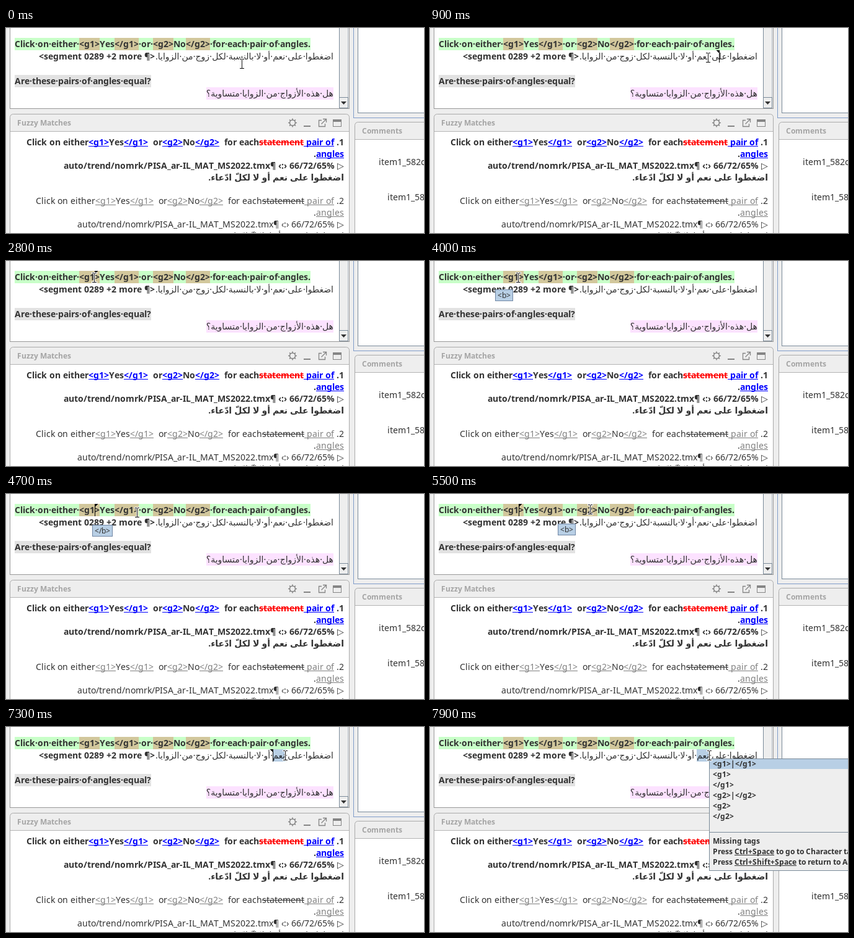
Recreate the animation shown at these times as an HTML page with a canvas. Size 674 px wide and 332 px high, loop 8 s.

```html
<!DOCTYPE html>
<html lang="en">
<head>
<meta charset="utf-8">
<title>Translation editor</title>
<style>
html, body { margin: 0; width: 100%; height: 100%; overflow: hidden; background: #eee; }
canvas { display: block; }
</style>
</head>
<body>
<canvas id="stage" width="674" height="332"></canvas>
<script>
const W = 674, H = 332, LOOP = 8000;
const FONT = '"Noto Sans", "DejaVu Sans", sans-serif';
const INK = '#333', GREY = '#808080', BLUE = '#0000ff', LIGHT = '#b8cfe5', EDGE = '#7a8a99';

const screen = document.getElementById('stage').getContext('2d');
const base = document.createElement('canvas');
base.width = W;
base.height = H;
let g = base.getContext('2d');

const rect = (x, y, w, h, color) => { g.fillStyle = color; g.fillRect(x, y, w, h); };
const frame = (x, y, w, h, fill, edge) => {
  rect(x, y, w, h, edge);
  rect(x + 1, y + 1, w - 2, h - 2, fill);
};

function setFont(size, bold) {
  g.font = (bold ? 'bold ' : '') + size + 'px ' + FONT;
}

const advance = ch => Math.round(g.measureText(ch).width);
const widthOf = text => [...text].reduce((sum, ch) => sum + advance(ch), 0);

function dot(x, y, color) {
  g.textAlign = 'center';
  g.fillStyle = color;
  g.fillText('·', x, y);
  g.textAlign = 'left';
}

// Left-to-right text on whole-pixel advances; returns the end x.
function text(str, x, y, o = {}) {
  const { size = 14, bold = false, color = INK, back, line, strike, dots } = o;
  setFont(size, bold);
  g.textAlign = 'left';
  g.direction = 'ltr';
  const w = widthOf(str);
  if (back) rect(x, y - 15, w, 20, back);
  let cx = x;
  for (const ch of str) {
    const step = advance(ch);
    if (ch === ' ') {
      if (dots) dot(cx + step / 2, y, color);
    } else {
      g.fillStyle = color;
      g.fillText(ch, cx, y);
    }
    cx += step;
  }
  if (line) rect(x, y + 1, w, 1, color);
  if (strike) rect(x, y - 5, w, 1, color);
  return cx;
}

function runs(list, x, y, common) {
  for (const [str, style] of list) x = text(str, x, y, { ...common, ...style });
}

// Right-to-left words, laid out from the right edge.
function arabic(str, right, y, { bold = false, back, dots } = {}) {
  setFont(14, bold);
  const words = str.split(' '), gap = advance(' ');
  const widths = words.map(w => g.measureText(w).width);
  if (back) {
    const w = Math.round(widths.reduce((a, b) => a + b) + gap * (words.length - 1));
    rect(right - w, y - 15, w, 20, back);
  }
  let x = right;
  words.forEach((word, i) => {
    g.direction = 'rtl';
    g.textAlign = 'right';
    g.fillStyle = INK;
    g.fillText(word, x, y);
    x -= widths[i];
    g.direction = 'ltr';
    if (dots && i < words.length - 1) dot(x - gap / 2, y, INK);
    x -= gap;
  });
}

function panel(x, y, w, title, titleX, titleY, headH) {
  g.beginPath();
  g.roundRect(x + .5, y + .5, w, 300, 5);
  g.fillStyle = '#eee';
  g.fill();
  g.strokeStyle = '#aaa';
  g.lineWidth = 1;
  g.stroke();
  rect(x + 1, y + headH, w - 1, 1, '#b4b4b4');
  rect(x + 1, y + headH + 1, w - 1, 300, '#fff');
  text(title, titleX, titleY, { size: 12, bold: true, color: '#a5a5a5' });
}

function headerIcons() {
  const c = '#858585';
  g.strokeStyle = c;
  g.lineWidth = 1.6;
  g.beginPath();
  g.arc(462, 153.5, 4.5, 0, 7);
  for (let i = 0; i < 8; i++) {
    const a = i * Math.PI / 4, cx = Math.cos(a), cy = Math.sin(a);
    g.moveTo(462 + 4.5 * cx, 153.5 + 4.5 * cy);
    g.lineTo(462 + 7 * cx, 153.5 + 7 * cy);
  }
  g.stroke();
  rect(480, 158, 11, 2, c);
  g.lineWidth = 1.3;
  g.beginPath();
  g.moveTo(509, 149.5); g.lineTo(504.5, 149.5); g.lineTo(504.5, 159.5);
  g.lineTo(514.5, 159.5); g.lineTo(514.5, 155);
  g.moveTo(508.5, 155.5); g.lineTo(516, 148);
  g.moveTo(511, 147.5); g.lineTo(516.5, 147.5); g.lineTo(516.5, 153);
  g.stroke();
  frame(527, 148, 14, 12, '#eee', c);
  rect(527, 148, 14, 4, c);
}

function editor() {
  rect(6, 0, 548, 131, '#999');
  rect(7, 0, 546, 130, '#fff');
  rect(537, 0, 16, 130, '#eee');
  rect(537, 0, 1, 130, EDGE);
  rect(551, 0, 1, 130, '#b5bdc6');
  frame(537, 112, 15, 18, '#eee', EDGE);
  g.fillStyle = INK;
  g.beginPath();
  g.moveTo(540, 119); g.lineTo(549, 119); g.lineTo(544.5, 124);
  g.fill();

  const plain = { back: '#c8ffc8' }, tag = { back: '#d2c79c' };
  runs([
    ['Click on either ', plain], ['<g1>', tag], ['Yes', plain], ['</g1>', tag],
    [' or ', plain], ['<g2>', tag], ['No', plain], ['</g2>', tag],
    [' for each pair of angles.', plain]
  ], 14, 31, { bold: true, dots: true });
  arabic('اضغطوا على نعم أو لا بالنسبة لكل زوج من الزوايا.', 528, 51, { dots: true });
  text('<segment 0289 +2 more ¶>', 53, 51, { bold: true });
  text('Are these pairs of angles equal?', 14, 91, { bold: true, dots: true, back: '#e2e2e2' });
  arabic('هل هذه الأزواج من الزوايا متساوية؟', 528, 111, { dots: true, back: '#fce2ff' });
}

function match(n, x, y, bold, tagColor, gone) {
  const tag = { color: tagColor, line: true };
  runs([
    ['Click on either'], ['<g1>', tag], ['Yes'], ['</g1>', tag], ['  or'],
    ['<g2>', tag], ['No'], ['</g2>', tag], ['  for each'],
    ['statement', { color: gone, strike: true }], [' pair of', tag], [' .' + n]
  ], x, y, { bold });
  runs([['.'], ['angles', tag]], 496, y + 19, { bold });
  const path = 'auto/trend/nomrk/PISA_ar-IL_MAT_MS2022.tmx¶ ‹:› 66/72/65% ▷';
  setFont(14, bold);
  text(path, 545 - widthOf(path), y + 38, { bold });
  arabic('اضغطوا على نعم أو لا لكلّ ادّعاء.', 545, y + 57, { bold });
}

function drawBase() {
  rect(0, 0, W, H, '#eee');
  editor();
  panel(6, 139, 547, 'Fuzzy Matches', 18, 158, 28);
  headerIcons();
  match(1, 33, 190, true, BLUE, '#ff0000');
  match(2, 48, 285, false, GREY, INK);

  rect(560, 0, 1, 146, '#7f9cc9');
  rect(560, 145, 114, 1, '#7f9cc9');
  rect(567, 0, 107, 138, EDGE);
  rect(568, 0, 106, 137, '#fff');
  panel(562, 152, 140, 'Comments', 574, 171, 28);
  text('item1_582c', 601, 222);
  text('item1_58', 615, 279);
}

// Pointer path: time, x, y.
const PATH = [
  [0, 380, 58], [200, 435, 59], [300, 462, 56], [600, 462, 56], [800, 452, 50],
  [900, 448, 48], [1600, 448, 48], [1800, 350, 33], [2000, 208, 20], [2200, 150, 26],
  [2300, 141, 27], [2600, 141, 27], [2700, 135, 34], [2800, 142, 27], [4000, 142, 27],
  [4300, 181, 30], [4500, 194, 31], [4600, 194, 31], [4900, 244, 28], [5000, 258, 25],
  [5600, 258, 25], [5800, 315, 45], [6100, 436, 66], [6200, 444, 65], [6300, 444, 60],
  [6400, 444, 60], [6700, 441, 47], [6900, 441, 47], [7100, 450, 46], [8000, 450, 46]
];

function pointerAt(t) {
  const i = Math.max(1, PATH.findIndex(p => p[0] >= t));
  const [t0, x0, y0] = PATH[i - 1], [t1, x1, y1] = PATH[i];
  const k = (t - t0) / (t1 - t0);
  return [Math.round(x0 + (x1 - x0) * k), Math.round(y0 + (y1 - y0) * k)];
}

function pointer([x, y]) {
  const shape = (color, grow) => {
    rect(x - grow, y - 7 - grow, 1 + 2 * grow, 15 + 2 * grow, color);
    for (const dy of [-8, 7]) {
      rect(x - 3 - grow, y + dy - grow, 3 + 2 * grow, 1 + 2 * grow, color);
      rect(x + 1 - grow, y + dy - grow, 3 + 2 * grow, 1 + 2 * grow, color);
    }
  };
  shape('#fff', 1);
  shape('#111', 0);
}

function caret(x, y, dir) {
  rect(x, y, 1, 20, '#000');
  for (let i = 0; i < 4; i++) rect(dir > 0 ? x + 1 : x - 4 + i, y + i, 4 - i, 1, '#000');
}

function tip(str, x, y) {
  setFont(12, false);
  frame(x, y, widthOf(str) + 8, 19, LIGHT, '#7187a5');
  text(str, x + 4, y + 14, { size: 12 });
}

function popup() {
  frame(450, 51, 240, 182, '#eee', EDGE);
  rect(451, 52, 223, 16, LIGHT);
  const style = { size: 12, bold: true };
  ['<g1>|</g1>', '<g1>', '</g1>', '<g2>|</g2>', '<g2>', '</g2>']
    .forEach((s, i) => text(s, 456, 64 + 17 * i, style));
  rect(451, 170, 223, 1, EDGE);
  text('Missing tags', 456, 189, style);
  const key = { line: true };
  runs([['Press '], ['Ctrl+Space', key], [' to go to Character tags']], 456, 206, style);
  runs([['Press '], ['Ctrl+Shift+Space', key], [' to return to Auto']], 456, 223, style);
}

function draw() {
  const t = Math.floor(performance.now() % LOOP / 100) * 100;
  const during = (a, b) => t >= a && t < b;
  g.drawImage(base, 0, 0);

  if (t >= 7300) {
    g.globalCompositeOperation = 'multiply';
    rect(430, 36, 21, 20, LIGHT);
    g.globalCompositeOperation = 'source-over';
  }

  if (during(700, 1200) || during(1700, 2200)) caret(466, 36, -1);
  if (during(2500, 6600) && (t - 2500) % 1000 < 500) caret(143, 16, 1);
  if (during(6700, 7300)) caret(441, 36, -1);
  if (during(7300, 7900)) caret(430, 36, -1);

  if (during(3700, 4200)) tip('<b>', 105, 46);
  if (during(4300, 4800)) tip('</b>', 139, 50);
  if (during(4900, 5700)) tip('<b>', 206, 48);
  if (t >= 7400) popup();

  pointer(pointerAt(t));
  requestAnimationFrame(draw);
}

drawBase();
g = screen;
draw();
</script>
</body>
</html>
```
